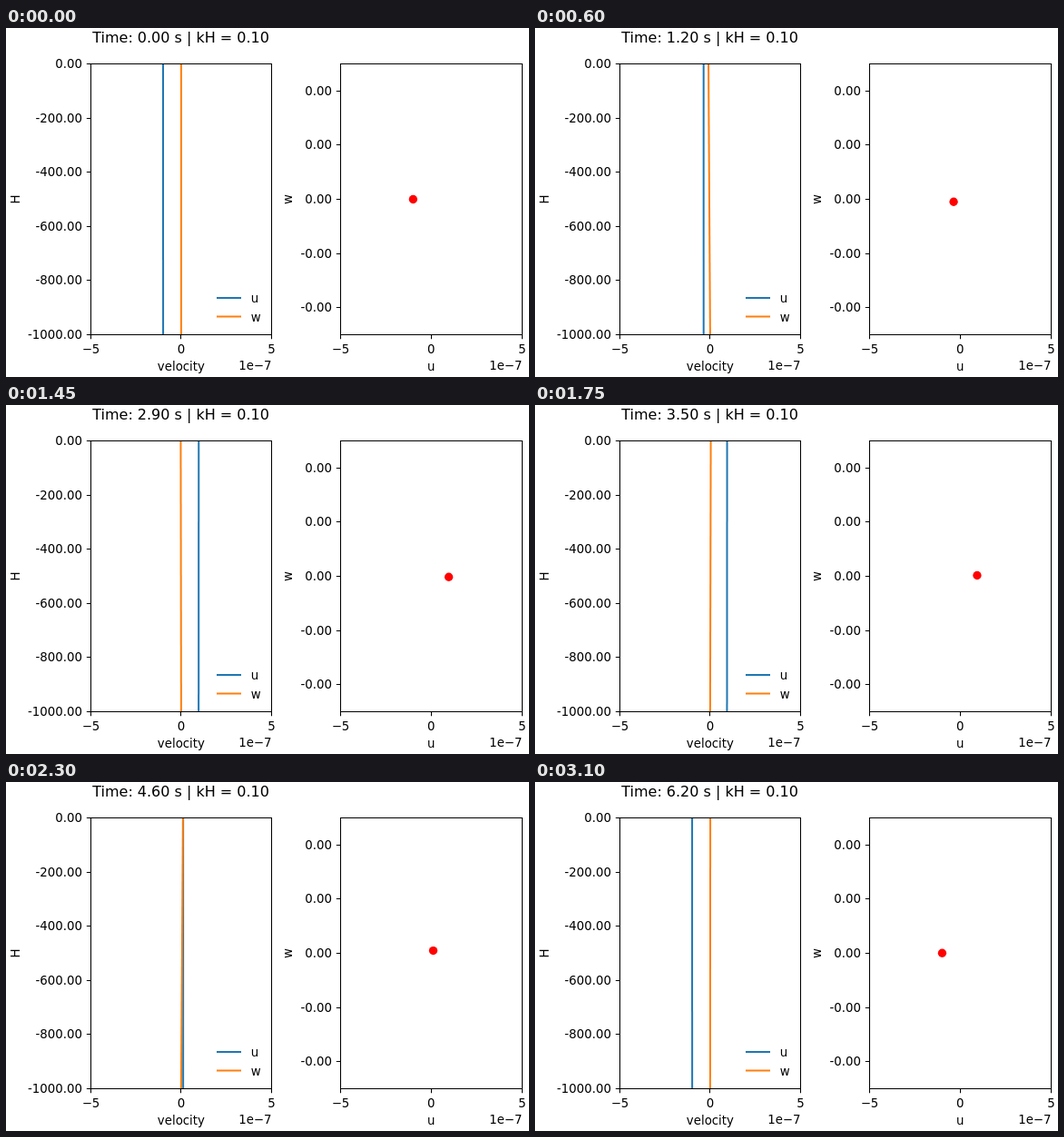
Animation of 576x384 px, one loop 3150 ms. Source, as an HTML page:

```html
<!DOCTYPE html>
<html>
<head>
<meta charset="utf-8">
<style>
  html, body { margin: 0; width: 100%; height: 100%; overflow: hidden; background: #fff; }
  svg { display: block; font: 13.333px "DejaVu Sans", sans-serif; }
  .axis { fill: none; stroke: #000; stroke-width: 1.07; }
  .curve { fill: none; stroke-width: 2; }
  .mid { text-anchor: middle; }
  .end { text-anchor: end; }
</style>
</head>
<body>
<svg id="plot" width="576" height="384" viewBox="0 0 576 384"></svg>
<script>
const TOP = 39.5, BOTTOM = 337.5, MID_Y = 188.5;
const LEFT_MID = 192.9, RIGHT_MID = 468.3;
const BLUE = '#1f77b4', ORANGE = '#ff7f0e';
const X_UNIT = 19.93, Y_UNIT = 29.8; // pixels per 1e-7
const KH = 0.1, FRAME = 50, FRAMES = 63;

const text = (x, y, str, cls = '', extra = '') =>
  `<text x="${x}" y="${y}" class="${cls}" ${extra}>${str}</text>`;
const sideways = (x, str) =>
  text(0, 0, str, 'mid', `transform="translate(${x} ${MID_Y}) rotate(-90)"`);
const snap = v => Math.floor(v) + 0.5;

function panel(x0, x1, mid, xLabel, yLabels, firstTick) {
  let path = `M${x0} ${TOP}H${x1}V${BOTTOM}H${x0}Z`;
  let labels = '';
  yLabels.forEach((str, i) => {
    const y = snap(firstTick + i * 59.6);
    path += `M${x0} ${y}h-4.67`;
    labels += text(x0 - 9.6, y + 4.5, str, 'end');
  });
  [[x0, '−5'], [mid, '0'], [x1, '5']].forEach(([x, str]) => {
    path += `M${snap(x)} ${BOTTOM}v4.67`;
    labels += text(x, 358, str, 'mid');
  });
  return `<path class="axis" d="${path}"/>` + labels +
    text(mid, 377, xLabel, 'mid') + text(x1, 376, '1e−7', 'end');
}

const legend = (y, color, str) =>
  `<path class="curve" stroke="${color}" d="M232 ${y}h27"/>` + text(269.7, y + 5, str);

const plot = document.getElementById('plot');
plot.innerHTML =
  text(192.6, 16, '', 'mid', 'id="title" font-size="16"') +
  `<path id="u" class="curve" stroke="${BLUE}"/>` +
  `<path id="w" class="curve" stroke="${ORANGE}"/>` +
  '<circle id="dot" r="4.67" fill="#f00"/>' +
  panel(93.5, 292.5, LEFT_MID, 'velocity',
    ['0.00', '-200.00', '-400.00', '-600.00', '-800.00', '-1000.00'], TOP) +
  panel(368.5, 568.5, RIGHT_MID, 'u',
    ['0.00', '0.00', '0.00', '-0.00', '-0.00'], 69.3) +
  sideways(15, 'H') + sideways(315, 'w') +
  legend(297, BLUE, 'u') + legend(317.5, ORANGE, 'w');

const [title, uLine, wLine, dot] =
  ['title', 'u', 'w', 'dot'].map(id => document.getElementById(id));

const setLine = (line, surface, bed) =>
  line.setAttribute('d',
    `M${LEFT_MID + surface * X_UNIT} ${TOP}L${LEFT_MID + bed * X_UNIT} ${BOTTOM}`);

const start = performance.now();
function draw() {
  const step = Math.floor(Math.max(0, performance.now() - start) / FRAME) % FRAMES;
  const t = step / 10;
  const u = -Math.cos(t), w = -Math.tanh(KH) * Math.sin(t);
  title.textContent = `Time: ${t.toFixed(2)} s | kH = ${KH.toFixed(2)}`;
  setLine(uLine, u, u / Math.cosh(KH));
  setLine(wLine, w, 0);
  dot.setAttribute('cx', RIGHT_MID + u * X_UNIT);
  dot.setAttribute('cy', MID_Y - w * Y_UNIT);
  requestAnimationFrame(draw);
}
draw();
</script>
</body>
</html>
```
